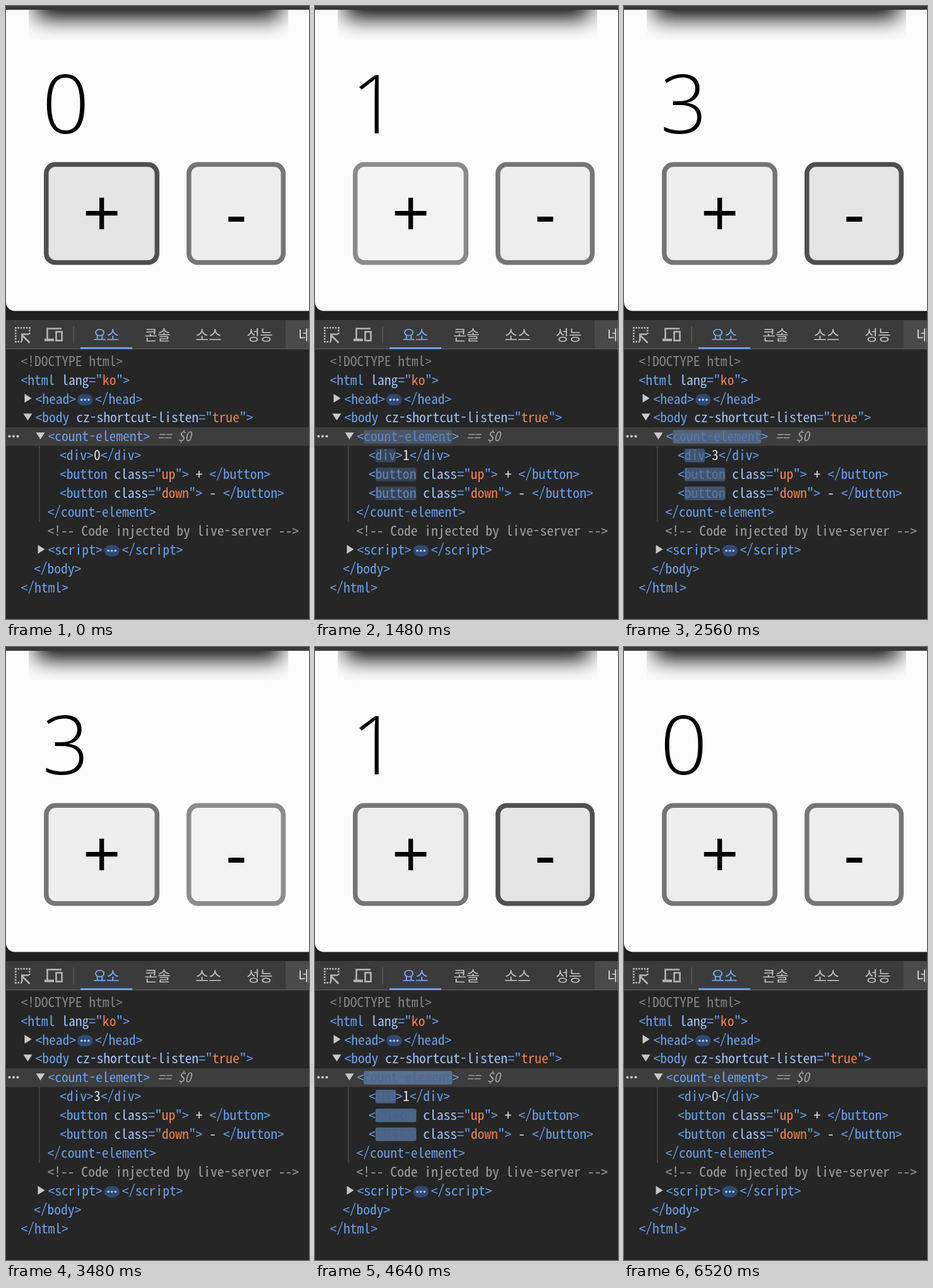
Animation of 480x972 px, one loop 6.62 s. Source, as an HTML page with a canvas:

```html
<!DOCTYPE html>
<html lang="ko">
<head>
<meta charset="utf-8">
<title>Counter element</title>
<style>
html, body { margin: 0; width: 100%; height: 100%; overflow: hidden; background: #262626; }
canvas { display: block; }
</style>
</head>
<body>
<canvas id="stage" width="480" height="972"></canvas>
<script>
const ctx = document.getElementById('stage').getContext('2d');
const LOOP = 6620, STEP = 40, FLASH = 1400;
const PITCH = 10.78, ROW = 29.92, FIRST_ROW = 563;

const MONO = '"Noto Sans Mono CJK KR", "Noto Sans Mono CJK JP", "Noto Sans Mono", monospace';
const HANGUL = '"Noto Sans CJK KR", "Noto Sans CJK JP", sans-serif';
ctx.font = '100px ' + MONO;
const MONO_SIZE = PITCH * 100 / ctx.measureText('0').width;

const TAG = [106, 160, 234], BASE = [40, 40, 40];
const C = {
  tag: rgb(TAG), attr: '#a3c3f5', value: '#ea8350', text: '#e6e6e6',
  grey: '#858585', comment: '#a0a0a0', icon: '#b4b4b4', arrow: '#c8c8c8'
};

// Each click: pressed, released (value changes), new value
const CLICKS = [
  { side: 'plus', down: 680, up: 880, value: 1 },
  { side: 'plus', down: 1360, up: 1520, value: 2 },
  { side: 'plus', down: 1960, up: 2120, value: 3 },
  { side: 'minus', down: 3440, up: 3640, value: 2 },
  { side: 'minus', down: 4160, up: 4320, value: 1 },
  { side: 'minus', down: 4800, up: 4960, value: 0 }
];
const HOVER = { plus: [0, 2440], minus: [2520, 5480] };
const LOOK = {
  normal: ['#ededed', '#757575'],
  hover: ['#e4e4e4', '#4f4f4f'],
  active: ['#f4f4f4', '#8b8b8b']
};

function rgb(c) { return `rgb(${c.map(Math.round).join(',')})`; }
function mix(a, b, k) { return rgb(a.map((v, i) => v + (b[i] - v) * k)); }

// cubic-bezier(0, 0, 0.2, 1)
function easeOut(x) {
  let lo = 0, hi = 1;
  for (let i = 0; i < 24; i++) {
    const s = (lo + hi) / 2;
    if (0.6 * (1 - s) * s * s + s * s * s < x) lo = s; else hi = s;
  }
  return 3 * (1 - lo) * lo * lo + lo * lo * lo;
}

function rect(x, y, w, h, color) {
  ctx.fillStyle = color;
  ctx.fillRect(x, y, w, h);
}

function round(x, y, w, h, r, color) {
  ctx.fillStyle = color;
  ctx.beginPath();
  ctx.roundRect(x, y, w, h, r);
  ctx.fill();
}

function poly(color, ...pts) {
  ctx.fillStyle = color;
  ctx.beginPath();
  pts.forEach(([x, y]) => ctx.lineTo(x, y));
  ctx.fill();
}

function dot(x, y, r, color) {
  ctx.fillStyle = color;
  ctx.beginPath();
  ctx.arc(x, y, r, 0, 7);
  ctx.fill();
}

// Centres the ink of a glyph on a point
function glyph(s, cx, cy) {
  ctx.font = '102.4px "Liberation Sans", Arial, sans-serif';
  const m = ctx.measureText(s);
  ctx.fillStyle = '#000';
  ctx.fillText(s,
    cx + (m.actualBoundingBoxLeft - m.actualBoundingBoxRight) / 2,
    cy + (m.actualBoundingBoxAscent - m.actualBoundingBoxDescent) / 2);
}

function button(x, w, label, cy, state) {
  const [fill, border] = LOOK[state];
  round(x, 247.5, w, 163, 18, border);
  round(x + 7.5, 255, w - 15, 148, 11, fill);
  glyph(label, x + w / 2 + 0.3, cy);
}

function stateOf(side, t) {
  if (CLICKS.some(c => c.side === side && t >= c.down && t < c.up)) return 'active';
  const [from, to] = HOVER[side];
  return t >= from && t < to ? 'hover' : 'normal';
}

function drawPage(t, value) {
  rect(0, 0, 480, 498, '#202020');
  round(0, -20, 500, 503.5, 14, '#fcfcfc');
  ctx.save();
  ctx.beginPath();
  ctx.rect(36, 6, 411, 47);
  ctx.clip();
  ctx.shadowColor = '#000';
  ctx.shadowBlur = 34;
  ctx.shadowOffsetY = 400;
  rect(48, -460, 387, 79, '#000');
  ctx.restore();
  rect(0, 0, 480, 6, '#393738');

  ctx.font = '300 130px "Open Sans", "Noto Sans", sans-serif';
  ctx.fillStyle = '#000';
  ctx.fillText(value, 57.5, 202);
  button(60, 183, '+', 328.5, stateOf('plus', t));
  button(286, 157, '-', 338, stateOf('minus', t));
}

function inspectIcon() {
  ctx.fillStyle = C.icon;
  for (let i = 0; i < 6; i++) {
    const d = i * 4.4;
    ctx.fillRect(14 + d, 509, 2.6, 2.6);
    ctx.fillRect(14, 509 + d, 2.6, 2.6);
    if (i < 3) {
      ctx.fillRect(36, 509 + d, 2.6, 2.6);
      ctx.fillRect(14 + d, 531, 2.6, 2.6);
    }
  }
  ctx.strokeStyle = C.icon;
  ctx.lineWidth = 2.6;
  ctx.beginPath();
  ctx.moveTo(37.5, 534);
  ctx.lineTo(26, 522.5);
  ctx.moveTo(25.3, 531);
  ctx.lineTo(25.3, 520.5);
  ctx.lineTo(36, 520.5);
  ctx.stroke();
}

function deviceIcon() {
  ctx.strokeStyle = C.icon;
  ctx.lineWidth = 2.6;
  ctx.beginPath();
  ctx.moveTo(88, 511.5);
  ctx.lineTo(65.5, 511.5);
  ctx.lineTo(65.5, 528);
  ctx.stroke();
  rect(61, 527.5, 15, 4, C.icon);
  ctx.strokeRect(79.5, 516.5, 9, 14);
}

function drawToolbar() {
  rect(0, 498, 480, 46, '#3b3b3b');
  rect(443, 498, 37, 46, '#4a4a4a');
  inspectIcon();
  deviceIcon();
  rect(106.5, 508, 1.5, 27, '#5c5c5c');
  ctx.font = '22.5px ' + HANGUL;
  ctx.textAlign = 'center';
  ['요소', '콘솔', '소스', '성능'].forEach((s, i) => {
    ctx.fillStyle = i ? '#c4c4c4' : '#7cacf8';
    ctx.fillText(s, 159 + 81 * i, 530);
  });
  ctx.fillStyle = '#d8d8d8';
  ctx.textAlign = 'left';
  ctx.fillText('네트워크', 463, 530);
  rect(0, 543, 480, 1.5, '#5a5a5a');
  rect(118, 541, 82, 3, '#6d9eec');
}

const rowY = i => FIRST_ROW + ROW * i;

// Spans are [text, colour, flashes]
function line(i, x, spans, k) {
  const y = rowY(i) + 7.7;
  x -= 0.5;
  ctx.font = MONO_SIZE + 'px ' + MONO;
  for (const [s, color, flashes] of spans) {
    const w = s.length * PITCH;
    const lit = flashes && k > 0.004;
    if (lit) {
      ctx.globalAlpha = k;
      round(x, rowY(i) - 10.5, w, 21.5, 3, '#7cacf8');
      ctx.globalAlpha = 1;
    }
    ctx.fillStyle = lit ? mix(TAG, BASE, k) : color;
    ctx.fillText(s, x, y);
    x += w;
  }
}

const tag = s => [s, C.tag];

function attr(name, value) {
  return [[' ' + name, C.attr], tag('="'), [value, C.value], tag('"')];
}

function open(name, extra = []) {
  return [tag('<'), [name, C.tag, true], ...extra, tag('>')];
}

function pill(x, i) {
  const y = rowY(i) + 1.5;
  round(x, y - 9, 24.5, 18, 9, '#2f4a75');
  for (let d = -1; d < 2; d++) dot(x + 12.2 + d * 5.6, y, 1.8, '#a8c7fa');
}

function arrowRight(x, i) {
  const y = rowY(i) - 0.8;
  poly(C.arrow, [x, y - 7], [x + 11, y], [x, y + 7]);
}

function arrowDown(x, i) {
  const y = rowY(i) - 6.5;
  poly(C.arrow, [x, y], [x + 14, y], [x + 7, y + 11]);
}

function drawTree(value, k) {
  rect(0, 544.5, 480, 427.5, '#262626');
  rect(0, 668, 480, 29.5, '#3d3d3d');
  rect(52, 698, 1.6, 120, '#484848');

  line(0, 24, [['<!DOCTYPE html>', C.grey]]);
  line(1, 24, [tag('<html'), ...attr('lang', 'ko'), tag('>')]);
  arrowRight(29.5, 2);
  line(2, 47, [tag('<head>')]);
  pill(113, 2);
  line(2, 141.5, [tag('</head>')]);
  arrowDown(27.5, 3);
  line(3, 47, [tag('<body'), ...attr('cz-shortcut-listen', 'true'), tag('>')]);

  for (let d = 0; d < 3; d++) dot(5.5 + d * 6.5, rowY(4) - 0.5, 2, '#cfcfcf');
  arrowDown(47.5, 4);
  line(4, 67, open('count-element'), k);
  ctx.font = `italic ${MONO_SIZE}px ${MONO}`;
  ctx.fillStyle = C.comment;
  ctx.fillText('== $0', 240, rowY(4) + 7.7);

  line(5, 85.5, [...open('div'), [String(value), C.text], tag('</div>')], k);
  line(6, 85.5, [...open('button', attr('class', 'up')), [' + ', C.text], tag('</button>')], k);
  line(7, 85.5, [...open('button', attr('class', 'down')), [' - ', C.text], tag('</button>')], k);
  line(8, 66, [tag('</count-element>')]);
  line(9, 66, [['<!-- Code injected by live-server -->', C.comment]]);
  arrowRight(50.5, 10);
  line(10, 67, [tag('<script>')]);
  pill(155.5, 10);
  line(10, 184, [tag('<' + '/script>')]);
  line(11, 44.5, [tag('</body>')]);
  line(12, 24, [tag('</html>')]);
}

function draw(now) {
  const t = Math.floor((now % LOOP) / STEP) * STEP;
  const last = CLICKS.filter(c => c.up <= t).pop();
  const value = last ? last.value : 0;
  const k = last ? 1 - easeOut(Math.min(1, (t - last.up) / FLASH)) : 0;
  drawPage(t, value);
  drawToolbar();
  drawTree(value, k);
}

const start = performance.now();
function tick() {
  draw(performance.now() - start);
  requestAnimationFrame(tick);
}
tick();
</script>
</body>
</html>
```
